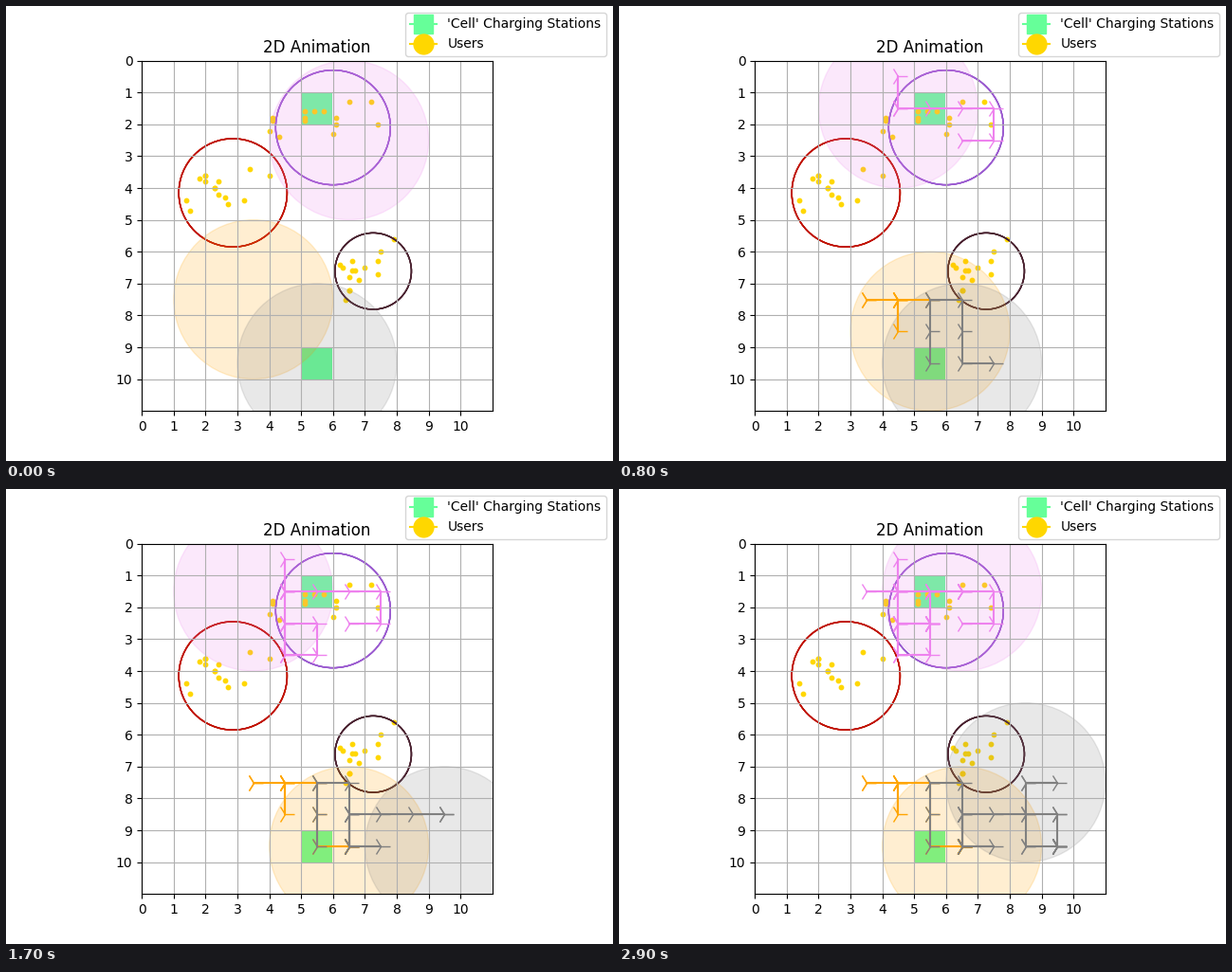
Write a matplotlib script that moves like this. It is 640 px wide and 480 px high and loops after 3000 ms.

```python
import numpy as np
import matplotlib.pyplot as plt
from matplotlib.animation import FuncAnimation
from matplotlib.lines import Line2D
from matplotlib.patches import Circle, Rectangle

FRAMES = 30
INTERVAL = 100
REACH = 2.5
GROUP_SIZE = 15
STATION = (102 / 255, 1.0, 153 / 255)
USER = "gold"

STEPS = {"U": (0, -1), "D": (0, 1), "L": (-1, 0), "R": (1, 0), ".": (0, 0)}

# colour, starting cell centre, one move per frame; then hover
AGENTS = [
    ("violet", (6.5, 2.5), "RULLLUD.DRDLUDUULRRD..LRUR"),
    ("orange", (3.5, 7.5), ".RDU..RDDR"),
    ("gray", (5.5, 9.5), "UU.RDDRLUD.URRR.D.....L.UURL"),
]

# colour, ring centre, ring radius, users' mean, users' spread, users' slope
GROUPS = [
    ("#9b5bd0", (6.0, 2.1), 1.8, (5.75, 1.85), (1.0, 0.3), 0.0),
    ("#c01000", (2.86, 4.15), 1.7, (2.6, 3.9), (0.8, 0.55), 0.0),
    ("#4a2230", (7.26, 6.61), 1.2, (7.0, 6.4), (0.5, 0.35), -0.8),
]


def walk(start, moves):
    """Positions visited, one per frame, beginning with the start."""
    moves = moves.ljust(FRAMES - 1, ".")
    return np.cumsum([start] + [STEPS[m] for m in moves], axis=0)


def scatter_users(rng, mean, spread, slope):
    """Users around a mean, on a grid of tenths."""
    offset = rng.normal(size=(GROUP_SIZE, 2)).clip(-1.8, 1.8) * spread
    offset[:, 1] += slope * offset[:, 0]
    return (mean + offset).round(1)


fig, ax = plt.subplots(figsize=(6.4, 4.8), dpi=100)
ax.set_aspect("equal")
ax.set_xlim(0, 11)
ax.set_ylim(11, 0)
ax.set_xticks(range(11))
ax.set_yticks(range(11))
ax.grid(True)
ax.set_title("2D Animation")

# Stations, users and rings lie below the reach discs, which tint them.
for corner in ((5, 1), (5, 9)):
    ax.add_patch(Rectangle(corner, 0.97, 1, facecolor=STATION, lw=0,
                           zorder=0.9))
rng = np.random.default_rng(4)
for color, center, radius, mean, spread, slope in GROUPS:
    users = scatter_users(rng, mean, spread, slope)
    ax.scatter(*users.T, s=10, color=USER, zorder=0.95)
    # Overlaid copies give the ring its hard edge.
    for _ in range(4):
        ax.add_patch(Circle(center, radius, fill=False, ec=color))

agents = []
for color, start, moves in AGENTS:
    disc = ax.add_patch(Circle(start, REACH, color=color, alpha=0.18))
    trail, = ax.plot([], [], color=color, marker="4", markersize=15)
    agents.append((walk(start, moves), disc, trail))

fig.legend(handles=[
    Line2D([], [], color=STATION, marker="s", markersize=15,
           label="'Cell' Charging Stations"),
    Line2D([], [], color=USER, marker="o", markersize=15, label="Users"),
])


def update(i):
    for path, disc, trail in agents:
        disc.center = path[i]
        trail.set_data(path[:i, 0], path[:i, 1])
    return [artist for _, *pair in agents for artist in pair]


anim = FuncAnimation(fig, update, frames=FRAMES, interval=INTERVAL,
                     repeat=True, repeat_delay=0)
plt.show()
```
